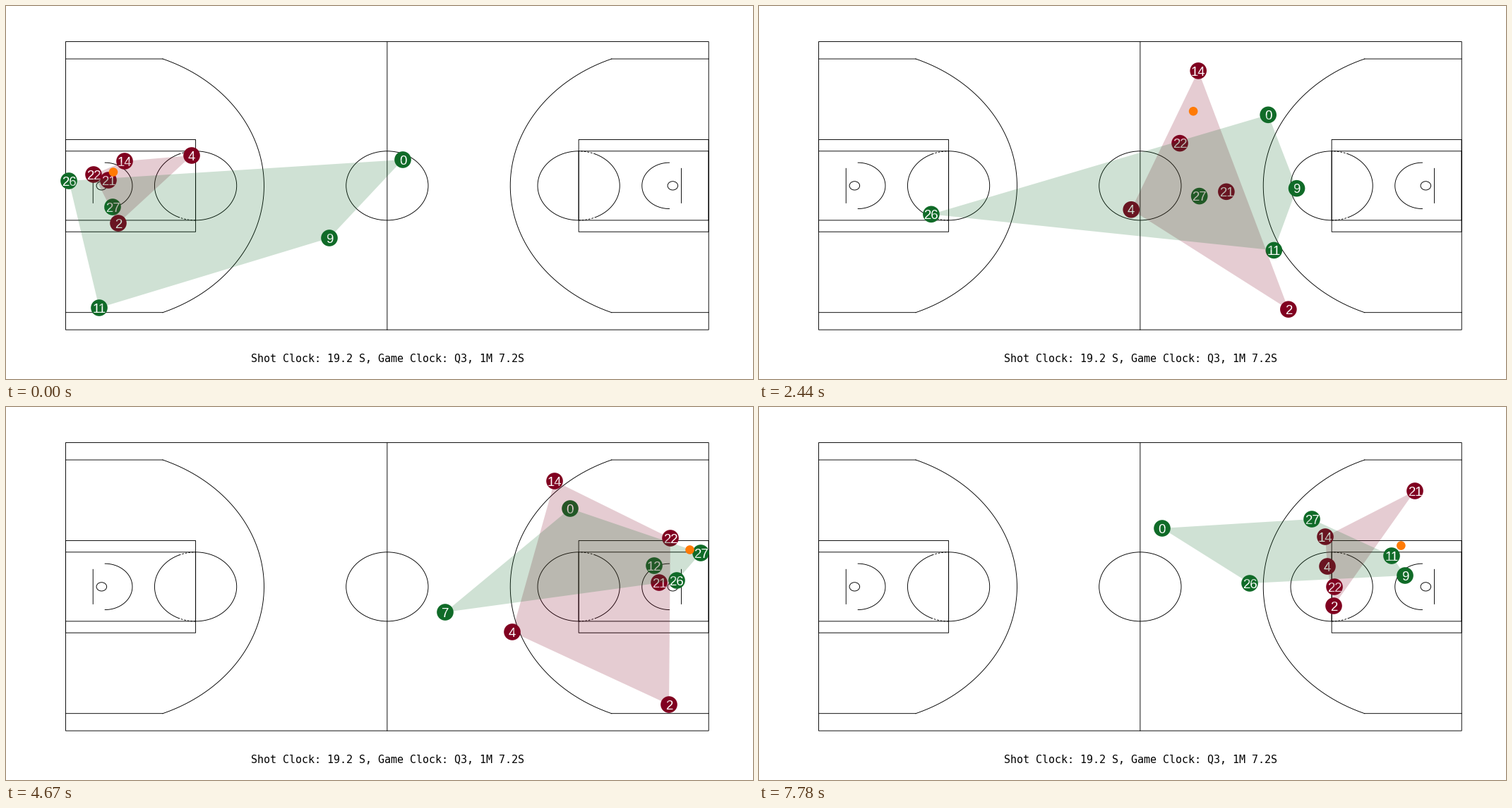
Animation, 1058 px wide and 529 px high, one loop 8000 ms. Source, as a matplotlib script:

```python
import numpy as np
import matplotlib.pyplot as plt
from matplotlib.animation import FuncAnimation
from matplotlib.patches import Circle, Ellipse, Polygon, Rectangle

W, H, DPI = 1058, 529, 64
PX = 72 / DPI                     # points per pixel
LOOP, TICK, STEPS = 8000, 40, 36
RED, GREEN, ORANGE = "#800020", "#106b28", "#ff7a05"

# Key points, evenly spaced in time over the loop
RED_PATHS = {
    "22": [(124, 239), (319, 168), (790, 216), (941, 186), (848, 201), (815, 255)],
    "21": [(145, 247), (370, 247), (854, 272), (925, 249), (915, 188), (929, 119)],
    "14": [(168, 220), (421, 94), (744, 102), (777, 105), (841, 157), (802, 184)],
    "4": [(263, 212), (350, 199), (651, 349), (717, 319), (750, 271), (805, 226)],
    "2": [(159, 308), (491, 387), (905, 450), (939, 422), (894, 337), (814, 282)],
}
GREEN_PATHS = {
    "0": [(562, 218), (600, 169), (802, 148), (799, 144), (640, 173), (571, 172)],
    "9": [(458, 329), (618, 274), (862, 248), (984, 207), (950, 217), (915, 239)],
    "11": [(132, 428), (478, 371), (882, 325), (950, 246), (938, 231), (896, 211)],
    "26": [(89, 248), (90, 287), (380, 297), (622, 291), (688, 262), (695, 250)],
    "27": [(151, 285), (354, 274), (807, 263), (918, 225), (873, 204), (783, 159)],
}

# Who holds the ball and when; between two holders it is passed
HOLDERS = [(-3, "22"), (3, "14"), (8, "14"), (14, "22"), (17, "22"),
           (25, "9"), (28, "21"), (37, "11")]

# Jersey numbers shown during the middle stretch of play
SWAP = {"9": "27", "11": "26", "26": "7", "27": "12"}
SWAP_STEPS = range(14, 32)


def track(points):
    """Catmull-Rom curve through the points, one row per step."""
    p = np.pad(np.array(points, float), ((1, 1), (0, 0)), mode="edge")
    u = np.linspace(0, len(points) - 1, STEPS)
    i = np.minimum(u.astype(int), len(points) - 2)
    s = (u - i)[:, None]
    a, b, c, d = (p[i + k] for k in range(4))
    return b + s / 2 * (c - a + s * (2 * a - 5 * b + 4 * c - d
                                     + s * (3 * (b - c) + d - a)))


def hull(points):
    """Convex hull by the monotone chain."""
    pts = sorted(map(tuple, points))

    def chain(seq):
        out = []
        for p in seq:
            while len(out) > 1 and (
                    (out[-1][0] - out[-2][0]) * (p[1] - out[-2][1])
                    <= (out[-1][1] - out[-2][1]) * (p[0] - out[-2][0])):
                out.pop()
            out.append(p)
        return out[:-1]

    return chain(pts) + chain(pts[::-1])


fig = plt.figure(figsize=(W / DPI, H / DPI), dpi=DPI, facecolor="white")
ax = fig.add_axes([0, 0, 1, 1])
ax.set(xlim=(0, W), ylim=(H, 0))
ax.axis("off")

# Court, measured in feet
LEFT, TOP, RIGHT, BOTTOM = 84.5, 50.5, 995.2, 459.2
FX, FY = (RIGHT - LEFT) / 94, (BOTTOM - TOP) / 50
CENTER, MID = (LEFT + RIGHT) / 2, (TOP + BOTTOM) / 2
INK = dict(lw=0.92 * PX, color="black", snap=False, zorder=1)
SHAPE = dict(lw=0.92 * PX, ec="black", fill=False, snap=False, zorder=1)


def line(x0, y0, x1, y1):
    ax.plot([x0, x1], [y0, y1], **INK)


def oval(x, radius):
    ax.add_patch(Ellipse((x, MID), 2 * radius * FX, 2 * radius * FY, **SHAPE))


def draw_half(base, side):
    """Draw the end at x = base; side is 1 when it opens to the right."""
    def px(feet):
        return base + side * feet * FX

    def curve(feet, radius, start, end, **style):
        a = np.radians(np.linspace(start, end, 160))
        ax.plot(px(feet + radius * np.cos(a)), MID + radius * FY * np.sin(a),
                **INK, **style)

    for half in (8, 6):
        ax.add_patch(Rectangle((min(base, px(19)), MID - half * FY), 19 * FX,
                               2 * half * FY, **SHAPE))
    for y in (TOP + 3 * FY, BOTTOM - 3 * FY):
        line(base, y, px(14.2), y)
    curve(5.25, 23.75, -67.9, 67.9)
    curve(19, 6, -90, 90)
    curve(19, 6, 114, 246)
    curve(19, 6, 90, 114, ls=(0, (3, 2)))
    curve(19, 6, 246, 270, ls=(0, (3, 2)))
    curve(5.75, 4, -90, 90)
    oval(px(5.25), 0.75)
    line(px(4), MID - 3 * FY, px(4), MID + 3 * FY)


ax.add_patch(Rectangle((LEFT, TOP), RIGHT - LEFT, BOTTOM - TOP, **SHAPE))
line(CENTER, TOP, CENTER, BOTTOM)
oval(CENTER, 6)
draw_half(LEFT, 1)
draw_half(RIGHT, -1)
ax.text(540.5, 505, "Shot Clock: 19.2 S, Game Clock: Q3, 1M 7.2S", ha="center",
        va="baseline", family="DejaVu Sans Mono", fontsize=15 * PX)


class Team:
    def __init__(self, paths, color, z, swap):
        self.swap = swap
        self.tracks = {name: track(p) for name, p in paths.items()}
        self.dots = [ax.add_patch(Circle((0, 0), 11.8, fc=color, lw=0,
                                         zorder=2 + z)) for _ in paths]
        self.tags = [ax.text(0, 0, name, color="white", ha="center",
                             va="baseline", family="Liberation Sans",
                             fontsize=18.67 * PX, zorder=3) for name in paths]
        self.area = ax.add_patch(Polygon([(0, 0), (1, 0), (0, 1)], fc=color,
                                         alpha=0.2, lw=0, zorder=4 + z))

    def place(self, step):
        swap = self.swap if step in SWAP_STEPS else {}
        for (name, path), dot, tag in zip(self.tracks.items(), self.dots,
                                          self.tags):
            x, y = dot.center = path[step]
            tag.set_position((x, y + 6.7))
            tag.set_text(swap.get(name, name))
        self.area.set_xy(hull(path[step] for path in self.tracks.values()))


teams = [Team(RED_PATHS, RED, 0, {}), Team(GREEN_PATHS, GREEN, 0.1, SWAP)]
players = {**teams[0].tracks, **teams[1].tracks}
ball = ax.add_patch(Circle((0, 0), 6.3, fc=ORANGE, lw=0, zorder=6))


def ball_spot(step):
    for (t0, giver), (t1, taker) in zip(HOLDERS, HOLDERS[1:]):
        if step < t1:
            w = (step - t0) / (t1 - t0)
            return (1 - w) * players[giver][step] + w * players[taker][step] + 6


def update(i):
    step = min((i + 1) * TICK * STEPS // LOOP, STEPS - 1)
    for team in teams:
        team.place(step)
    ball.center = ball_spot(step)


anim = FuncAnimation(fig, update, frames=LOOP // TICK, interval=TICK,
                     repeat=True, repeat_delay=0)
plt.show()
```
